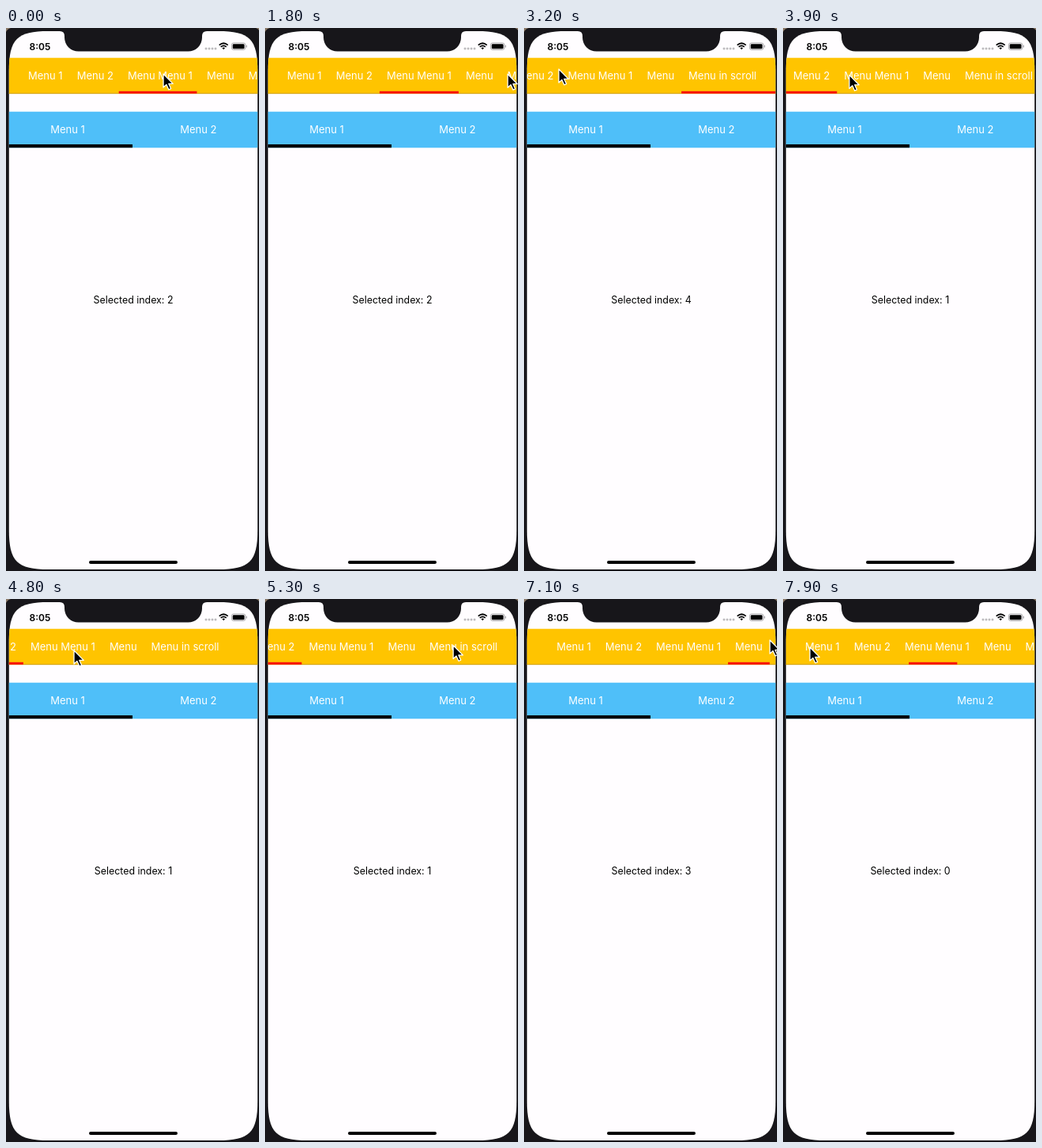
An HTML page for the animation above (8000 ms loop, 320x686 px).

```html
<!DOCTYPE html>
<html lang="en">
<head>
<meta charset="utf-8">
<title>Scrolling tab menu</title>
<style>
  html, body { margin: 0; width: 100%; height: 100%; overflow: hidden; background: #17161a; }
  svg { display: block; width: 320px; height: 686px; }
  text { font: 13px Inter, Roboto, sans-serif; white-space: pre; }
</style>
</head>
<body>
<svg viewBox="0 0 320 686">
  <defs>
    <clipPath id="screen">
      <path d="M3.8 54C3.8 14 13.8 4 53.8 4H268.2C308.2 4 318.2 14 318.2 54V634C318.2 674 308.2 684 268.2 684H53.8C13.8 684 3.8 674 3.8 634Z"/>
    </clipPath>
    <clipPath id="bar"><rect x="3.8" y="37" width="314.4" height="47"/></clipPath>
  </defs>

  <rect width="320" height="686" fill="#17161a"/>
  <path d="M0 0H6Q2 1 0 5Z M320 0H316Q319 1 320 3Z" fill="#8b7a68"/>

  <g clip-path="url(#screen)">
    <rect width="320" height="686" fill="#fffdff"/>
    <rect y="37.7" width="320" height="45.3" fill="#ffc400"/>
    <rect y="82" width="320" height="1.2" fill="#d6a50c"/>
    <rect y="105.7" width="320" height="45.6" fill="#4fbff9"/>
    <rect y="147" width="160" height="4.2"/>
    <g fill="#fff" text-anchor="middle">
      <text x="78" y="133.3">Menu 1</text>
      <text x="243.3" y="133.3">Menu 2</text>
    </g>
    <rect x="105" y="672.9" width="112" height="4.2" rx="2.1"/>
  </g>
  <path d="M68 3V4Q74 4 74 10V12A17.6 17.6 0 0 0 91.6 29.6H230.4A17.6 17.6 0 0 0 248 12V10Q248 4 254 4V3Z" fill="#17161a"/>

  <text x="29.5" y="27.6" style="font-size:12px;font-weight:600">8:05</text>
  <path d="M253 26H266" stroke="#bdbbbe" stroke-width="3" stroke-linecap="round" stroke-dasharray="0 4"/>
  <g fill="none" stroke="#000" stroke-width="1.7">
    <path d="M269.7 21.6Q275.2 16.9 280.7 21.6M271.7 23.9Q275.2 21 278.7 23.9"/>
    <path d="M273.4 25.2Q275.2 23.9 277 25.2L275.2 27.2Z" fill="#000" stroke="none"/>
    <rect x="285.4" y="18.9" width="17.4" height="8.6" rx="2.4" stroke="#99979b" stroke-width=".8"/>
    <rect x="286.7" y="20.2" width="14.8" height="6" rx="1.3" fill="#000" stroke="none"/>
    <path d="M304.2 21.8V24.6" stroke="#99979b" stroke-width="1.1"/>
  </g>

  <g clip-path="url(#bar)">
    <g id="menu" fill="#fff"><rect id="underline" y="79.8" height="3" fill="#f8140c"/></g>
  </g>
  <text id="label" x="161" y="348" text-anchor="middle" style="font-size:12.4px"></text>
  <path id="cursor" d="M0 0V17L3.9 13.4L6.8 19.8L9.6 18.6L6.8 12.4H12.2Z"
        stroke="#fff" stroke-width="1.3" stroke-linejoin="round"/>
</svg>

<script>
const LOOP = 8000, MOVE = 600, SETTLE = 350, TAP_DELAY = 90, RELEASE_DELAY = 50;
const VIEW_LEFT = 4, VIEW_RIGHT = 318, INSET = 15, PADDING = 9, RUBBER = 0.36;
const $ = id => document.getElementById(id);

const clamp = (v, low, high) => Math.min(high, Math.max(low, v));
const mix = (a, b, p) => a + (b - a) * p;
const progress = (t, start, duration) => {
  const p = clamp((t - start) / duration, 0, 1);
  return p * p * (3 - 2 * p);
};

// Lay the items out side by side; the outer ones also cover the inset
let edge = VIEW_LEFT;
const items = ['Menu 1', 'Menu 2', 'Menu Menu 1', 'Menu', 'Menu in scroll'].map((name, i, all) => {
  const text = document.createElementNS('http://www.w3.org/2000/svg', 'text');
  text.textContent = name;
  $('menu').append(text);
  const left = edge;
  const x = left + PADDING + (i === 0 ? INSET : 0);
  text.setAttribute('x', x);
  text.setAttribute('y', 65.4);
  edge = x + text.getComputedTextLength() + PADDING + (i === all.length - 1 ? INSET : 0);
  return { left, right: edge };
});
const maxScroll = edge - VIEW_RIGHT;

// Where the pointer arrives and when, and what it does there
const stops = [
  { at: -400, x: 199, y: 58, tap: 2 },
  { at: 950, x: 307, y: 58 },
  { at: 2180, x: 307, y: 59, tap: 4 },
  { at: 3150, x: 44, y: 52, tap: 1 },
  { at: 4000, x: 87, y: 60 },
  { at: 4200, x: 176, y: 66 },
  { at: 4800, x: 86, y: 65, drag: true },
  { at: 5400, x: 250, y: 58, tap: 4 },
  { at: 6180, x: 176, y: 57, tap: 3 },
  { at: 7100, x: 311, y: 52, drag: true },
  { at: 7400, x: 170, y: 112 },
  { at: 7670, x: 34, y: 61, tap: 0 },
];

const inRange = scroll => clamp(scroll, 0, maxScroll);
const rubberBand = scroll => mix(inRange(scroll), scroll, RUBBER);
const reveal = (item, scroll) => clamp(scroll, item.right - VIEW_RIGHT, item.left - VIEW_LEFT);

function sceneAt(t) {
  const scene = { ...items[1], ...stops[0], scroll: 0, index: 1 };
  let previous = -LOOP;
  for (const { at, x, y, tap, drag } of stops) {
    const duration = drag ? SETTLE : Math.min(MOVE, at - previous);
    const moved = progress(t, at - duration, duration);
    const startX = scene.x;
    scene.x = mix(scene.x, x, moved);
    scene.y = mix(scene.y, y, moved);

    if (drag && moved > 0) {
      const dragged = rubberBand(scene.scroll + startX - scene.x);
      scene.scroll = mix(dragged, inRange(dragged), progress(t, at + RELEASE_DELAY, SETTLE));
    }
    if (tap !== undefined && t >= at + TAP_DELAY) {
      const p = progress(t, at + TAP_DELAY, SETTLE), item = items[tap];
      scene.index = tap;
      scene.left = mix(scene.left, item.left, p);
      scene.right = mix(scene.right, item.right, p);
      scene.scroll = mix(scene.scroll, reveal(item, scene.scroll), p);
    }
    previous = at;
  }
  return scene;
}

function draw(t) {
  const { x, y, left, right, scroll, index } = sceneAt(t);
  $('underline').setAttribute('x', left);
  $('underline').setAttribute('width', right - left);
  $('menu').setAttribute('transform', `translate(${-scroll} 0)`);
  $('cursor').setAttribute('transform', `translate(${x} ${y})`);
  $('label').textContent = `Selected index: ${index}`;
}

const begin = performance.now();
function frame() {
  draw((performance.now() - begin) % LOOP);
  requestAnimationFrame(frame);
}
frame();
</script>
</body>
</html>
```
